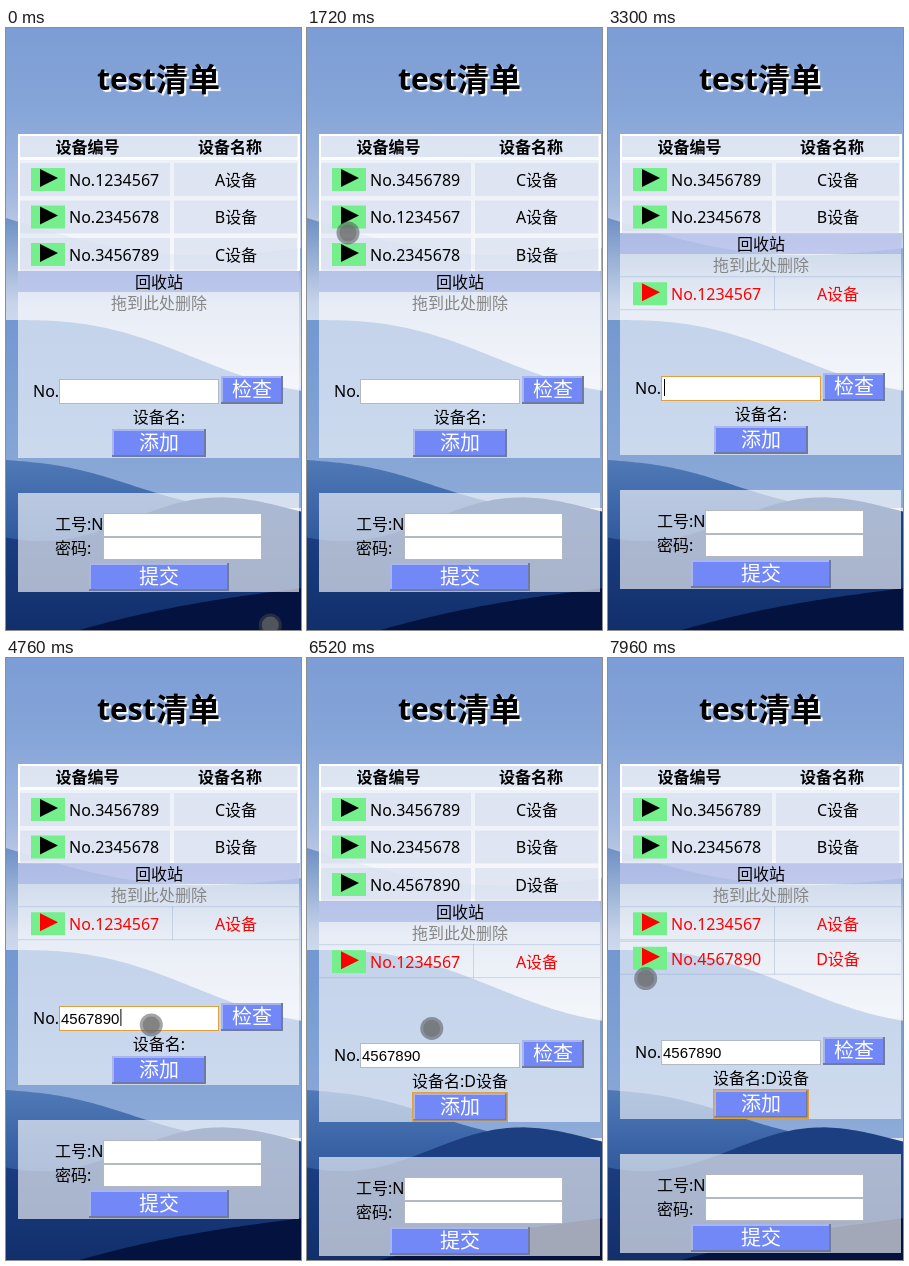
Animation, 295 px wide and 602 px high, one loop 8 s. Source, as an HTML page with a canvas:

```html
<!DOCTYPE html>
<html lang="zh-CN">
<head>
<meta charset="utf-8">
<style>
html, body { margin: 0; width: 295px; height: 602px; overflow: hidden; }
canvas { display: block; }
</style>
</head>
<body>
<canvas id="stage" width="295" height="602"></canvas>
<script>
const ctx = document.getElementById('stage').getContext('2d');
const LOOP = 8000;
const SANS = '"Noto Sans", "Open Sans", "Noto Sans CJK SC", "Noto Sans CJK", sans-serif';
const ARIAL = '"Liberation Sans", Arial, sans-serif';
const GREY = '#eee';
const NUMBERS = { A: 'No.1234567', B: 'No.2345678', C: 'No.3456789', D: 'No.4567890' };

// A dragged row is held from `press` to `drop` and takes two slots in turn, starting at `shift`.
const DRAGS = [
  { id: 'C', press: 940, drop: 1440, shift: 1060, slots: [1, 0] },
  { id: 'A', press: 2050, drop: 2720, shift: 2210, slots: [2, 3] },
  { id: 'D', press: 7030, drop: 7690, shift: 7300, slots: [3, 4] }
];
const CLICKS = { input: 3040, check: 5170, add: 6390 };
const MOVES = [
  ...DRAGS.flatMap(({ id, shift, slots }) => slots.map((slot, i) => ({ id, slot, at: shift + 160 * i }))),
  { id: 'D', slot: 2, at: CLICKS.add }
].sort((a, b) => a.at - b.at);

// Pointer paths: [time, x, y]; it is hidden between paths.
const PATHS = [
  [[0, 265, 598], [260, 82, 316], [800, 43, 236], [940, 43, 234], [1260, 34, 152],
   [1720, 41, 205], [1980, 39, 188], [2100, 39, 188], [2630, 41, 290], [2750, 41, 291]],
  [[2890, 122, 356], [3050, 145, 367], [3290, 145, 367]],
  [[4760, 145, 367], [5100, 245, 362], [5340, 245, 362], [5600, 172, 415], [5850, 172, 415]],
  [[6390, 153, 418], [6910, 41, 229], [7040, 41, 229], [7300, 37, 283], [7500, 34, 316], [8000, 38, 321]]
];

const mix = (a, b, k) => a + (b - a) * k;
const clamp = k => Math.max(0, Math.min(1, k));
const easeOut = k => 1 - (1 - clamp(k)) ** 3;

function box(x, y, w, h, fill) {
  ctx.fillStyle = fill;
  ctx.fillRect(x, y, w, h);
}

function frame(x, y, w, h, color, line = 1) {
  ctx.strokeStyle = color;
  ctx.lineWidth = line;
  ctx.strokeRect(x + line / 2, y + line / 2, w - line, h - line);
}

// Text placed by its vertical centre.
function label(text, x, y, { size = 16, color = '#000', align = 'left', weight = '', family = SANS } = {}) {
  ctx.font = `${weight} ${size}px ${family}`;
  ctx.textAlign = align;
  ctx.fillStyle = color;
  ctx.fillText(text, x, y + size * 0.37);
}

function fade(y0, y1, ...colors) {
  const g = ctx.createLinearGradient(0, y0, 0, y1);
  colors.forEach((c, i) => g.addColorStop(i / (colors.length - 1), c));
  return g;
}

// A ridge line: a tilted sine wave filled down to `bottom`.
function hill(start, tilt, height, length, phase, bottom, ...colors) {
  ctx.beginPath();
  ctx.moveTo(0, bottom);
  for (let x = 0; x <= 296; x += 4) ctx.lineTo(x, start + tilt * x + height * Math.sin(x / length + phase));
  ctx.lineTo(296, bottom);
  ctx.fillStyle = fade(start, bottom, ...colors);
  ctx.fill();
}

function landscape() {
  box(0, 0, 295, 602, fade(0, 250, '#7c9dd5', '#86a5d8', '#a3b9df', '#dfe2ec'));
  hill(190, 0.1, 20, 95, 0, 360, '#6d90c4', '#c6d3e9', '#e4eaf4');
  hill(292, 0.2, -12, 60, 0, 480, '#7398d0', '#7fa1d4', '#8eabd8');
  hill(432, 0.2, -5, 40, 0, 540, '#5079b6', '#3a64a6', '#264f92');
  hill(500, -0.07, -16, 50, -2.5, 602, '#1c3f82', '#112f6b');
  hill(624, -0.22, -8, 90, 0, 603, '#081c52', '#04123f');
}

function button(text, x, y, w, focused) {
  box(x, y, w, 28, '#7288f7');
  box(x, y, w, 2, '#a9b5ee');
  box(x, y, 2, 28, '#a9b5ee');
  box(x, y + 26, w, 2, '#707a9c');
  box(x + w - 2, y, 2, 28, '#707a9c');
  if (focused) frame(x - 1, y - 1, w + 2, 30, '#e2a040', 1.5);
  label(text, x + w / 2, y + 14, { size: 20, color: '#fff', align: 'center' });
}

function field(x, y, w, h, focused) {
  box(x, y, w, h, '#fff');
  frame(x, y, w, h, focused ? '#e0a040' : '#b4b8c0');
}

function rowContent(id, dx, y, color) {
  box(25 + dx, y - 12, 34, 23, '#74ef8b');
  ctx.fillStyle = color;
  ctx.beginPath();
  ctx.moveTo(34 + dx, y - 11);
  ctx.lineTo(52 + dx, y - 2);
  ctx.lineTo(34 + dx, y + 7);
  ctx.fill();
  label(NUMBERS[id], 63 + dx, y, { color });
  label(id + '设备', 230 + dx, y, { color, align: 'center' });
}

function cells(dx, y, fill) {
  box(14 + dx, y - 17, 150, 33, fill);
  box(168 + dx, y - 17, 123, 33, fill);
}

function tableRow(id, y) {
  cells(0, y, 'rgba(214,222,238,.65)');
  rowContent(id, 0, y, '#000');
}

function binRow(id, y) {
  const line = 'rgba(120,150,195,.3)';
  box(12, y - 18, 281, 1, line);
  box(12, y + 15, 281, 1, line);
  box(166, y - 18, 1, 34, line);
  rowContent(id, 0, y, '#f00');
}

function ghostRow(id, y) {
  box(12, y - 20, 282, 38, '#fff');
  cells(0, y, GREY);
  rowContent(id, 0, y, '#000');
}

function floatingRow(id, dx, y) {
  ctx.globalAlpha = 0.8;
  box(12 + dx, y - 21, 281, 38, '#fff');
  cells(dx, y - 1, GREY);
  rowContent(id, dx, y - 1, '#000');
  frame(12 + dx, y - 21, 281, 38, '#f58080');
  ctx.globalAlpha = 1;
}

function move(order, { id, slot }) {
  const rest = order.replace(id, '');
  return rest.slice(0, slot) + id + rest.slice(slot);
}

// Row order as "table|bin", with the order before the last move.
function orderAt(t) {
  let order = 'ABC|', before = order, since = 0;
  for (const step of MOVES) {
    if (step.at > t) break;
    before = order;
    order = move(order, step);
    since = step.at;
  }
  return { order, before, since };
}

// Row centres, plus the shift of everything below the lists.
function layout(order, ghost) {
  const [table, bin] = order.split('|');
  const rows = {};
  [...table].forEach((id, i) => rows[id] = 152 + 37.5 * i);
  const binTop = 129 + 38 * table.length;
  let y = binTop + 43;
  for (const id of bin) {
    const h = id === ghost ? 38 : 34.5;
    rows[id] = y + h / 2 + 1;
    y += h;
  }
  return { table, bin, rows, binTop, shift: Math.trunc(y - 286) };
}

function pointerAt(t) {
  const path = PATHS.find(p => t >= p[0][0] && t <= p[p.length - 1][0]);
  if (!path) return null;
  const i = Math.max(1, path.findIndex(p => p[0] >= t));
  const [a, b] = [path[i - 1], path[i]];
  const k = (t - a[0]) / (b[0] - a[0]);
  return [mix(a[1], b[1], k), mix(a[2], b[2], k)];
}

function pointer([x, y], alpha) {
  ctx.globalAlpha = alpha;
  for (const [r, color] of [[11.5, 'rgba(70,72,76,.5)'], [8.5, 'rgba(110,110,110,.6)']]) {
    ctx.fillStyle = color;
    ctx.beginPath();
    ctx.arc(x, y, r, 0, 7);
    ctx.fill();
  }
  ctx.globalAlpha = 1;
}

function lists({ table, bin, binTop }, ghost, rowY) {
  box(12, 106, 282, binTop - 106, 'rgba(255,255,255,.6)');
  frame(12, 106, 282, binTop - 106, '#fff', 2);
  box(14, 108, 277, 21, 'rgba(214,222,238,.65)');
  box(12, 129, 282, 3, 'rgba(255,255,255,.8)');
  label('设备编号', 81.5, 119, { weight: 'bold', align: 'center' });
  label('设备名称', 224, 119, { weight: 'bold', align: 'center' });

  box(12, binTop, 281, 21, 'rgba(140,155,225,.45)');
  label('回收站', 153, binTop + 11, { align: 'center' });
  label('拖到此处删除', 153, binTop + 32, { color: '#858585', align: 'center' });

  for (const id of table) if (id !== ghost) tableRow(id, rowY(id));
  for (const id of bin) if (id !== ghost) binRow(id, rowY(id));
  if (ghost) ghostRow(ghost, rowY(ghost));
}

function forms(t, shift) {
  const focus = Object.keys(CLICKS).findLast(name => t >= CLICKS[name]);
  ctx.save();
  ctx.translate(0, shift);
  label('No.', 27, 363);
  field(53, 351, 160, 25, focus === 'input');
  const typed = '4567890'.slice(0, Math.max(0, Math.floor((t - 3700) / 110) + 1));
  label(typed, 55, 363, { size: 15, family: ARIAL });
  if (focus === 'input') box(56 + ctx.measureText(typed).width, 354, 1, 17, '#000');
  button('检查', 215, 348, 62, focus === 'check');
  label(t < 5300 ? '设备名:' : '设备名:D设备', 153, 389, { align: 'center' });
  button('添加', 106, 401, 94, focus === 'add');

  box(12, 465, 281, 99, 'rgba(255,255,255,.63)');
  label('工号:N', 49, 496);
  field(97, 485, 159, 24);
  label('密码:', 49, 520);
  field(97, 509, 159, 23);
  button('提交', 83, 535, 140);
  ctx.restore();
}

function toast(t) {
  const leave = CLICKS.add;
  if (t < 5450 || t >= leave + 110) return;
  const shown = t < leave ? easeOut((t - 5450) / 300) : 1 - (t - leave) / 110;
  const x = mix(300, 215, shown);
  ctx.save();
  ctx.shadowColor = 'rgba(0,0,0,.45)';
  ctx.shadowBlur = 5;
  box(x, 210, 360, 129, '#202226');
  ctx.restore();
  label('qorvtamk', x + 16, 238, { size: 15, color: '#fff' });
  label('添加成功', x + 16, 265, { size: 13, color: '#a2a4a8' });
}

function title() {
  ctx.save();
  ctx.shadowColor = '#fff';
  ctx.shadowOffsetX = ctx.shadowOffsetY = 2;
  ctx.shadowBlur = 1;
  label('test', 91, 51, { size: 30, weight: 'bold' });
  label('清单', 150, 51, { size: 32, weight: 'bold' });
  ctx.restore();
}

function draw(t) {
  const drag = DRAGS.find(d => t >= d.press && t < d.drop);
  const { order, before, since } = orderAt(t);
  const now = layout(order, drag?.id);
  const last = layout(before, drag?.id);
  const slide = easeOut((t - since) / 150);
  const rowY = id => mix(last.rows[id] ?? now.rows[id], now.rows[id], slide);

  landscape();
  title();
  box(12, 107, 281, 323 + now.shift, 'rgba(255,255,255,.58)');
  lists(now, drag?.id, rowY);
  forms(t, now.shift);

  const at = pointerAt(t);
  if (drag && at) {
    const [x, y] = pointerAt(drag.press);
    const home = layout(orderAt(drag.press).order).rows[drag.id];
    floatingRow(drag.id, at[0] - x, home + at[1] - y);
  }
  toast(t);
  if (at) pointer(at, drag ? 0.5 : 1);
}

function tick() {
  draw(performance.now() % LOOP);
  requestAnimationFrame(tick);
}
tick();
</script>
</body>
</html>
```
